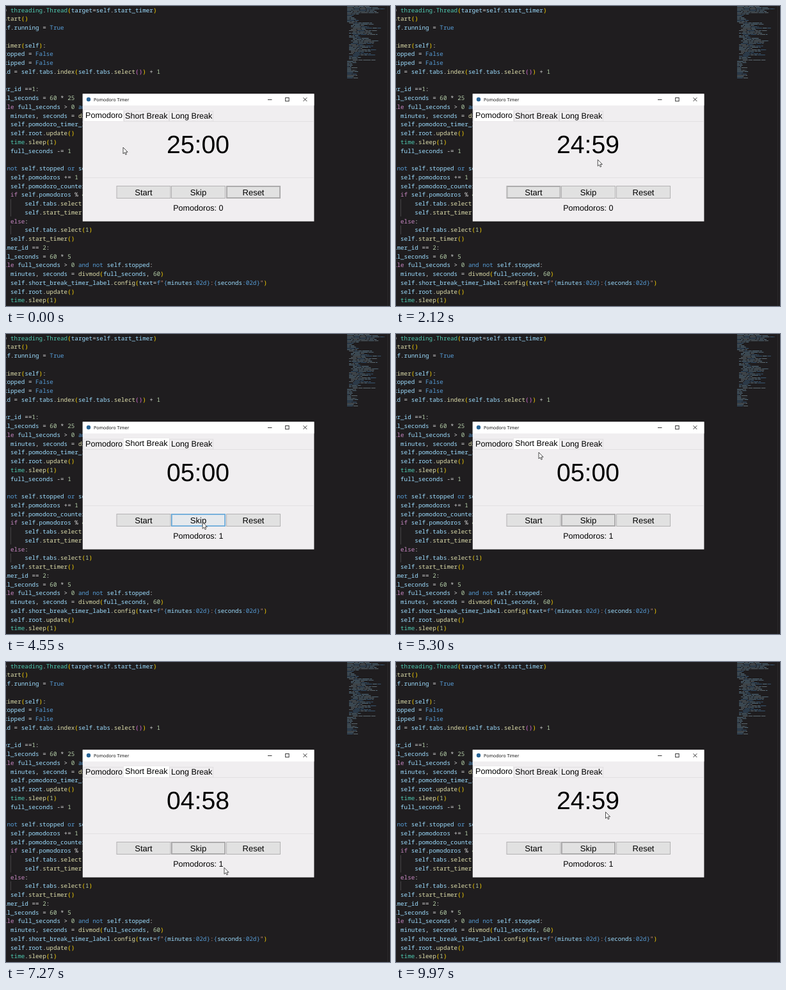
Animation of 600x469 px, one loop 10000 ms. Source, as an HTML page:

```html
<!DOCTYPE html>
<html lang="en">
<head>
<meta charset="utf-8">
<title>Pomodoro Timer</title>
<style>
  html, body { margin: 0; width: 100%; height: 100%; overflow: hidden; background: #1f1d1f; }
  svg { display: block; width: 600px; height: 469px; }
  text { white-space: pre; text-rendering: geometricPrecision; }
  #code { font: 500 9.29px "Noto Sans Mono", monospace; }
  #app { font: 12.6px "Liberation Sans", Arial, sans-serif; fill: #000; }
  #app .title { font: 7px "Open Sans", sans-serif; fill: #000; }
  .mid { text-anchor: middle; }
  #app .clock { font-size: 39.2px; }
  .btn text { font-size: 13px; }
  .btn .face { fill: #e1e1e1; stroke: #b3b2b3; }
  .btn .ring { fill: none; stroke: none; }
  .btn.focus .face { stroke: #a8a7a8; }
  .btn.focus .ring { stroke: #b0afb0; }
  .btn.hover .face { fill: #e5e9ed; stroke: #62a3d3; }
  .btn.hover.focus .ring { stroke: #8bbde2; }
  .btn.down .face { fill: #cce4f7; stroke: #3d7fb3; }
  .tab rect { fill: #f0eef0; stroke: #e0dee0; }
  .tab.on rect { fill: #fff; stroke: #ebe9eb; }
</style>
</head>
<body>
<svg viewBox="0 0 600 469">
  <rect width="600" height="469" fill="#1f1d1f"/>
  <path d="M7.5 302V329M7.5 343V357" stroke="#454345"/>
  <g id="code"></g>
  <g id="map"></g>
  <path d="M596.5 0V469" stroke="#2b292b"/>
  <g id="app">
    <rect x="119.8" y="137.3" width="361.6" height="199.4" fill="#f0eef0"/>
    <rect x="119.8" y="137.3" width="361.6" height="18.2" fill="#fff"/>
    <circle cx="129" cy="146" r="3.2" fill="#2a6595"/>
    <text class="title" x="137" y="148.7">Pomodoro Timer</text>
    <g fill="none" stroke="#222" stroke-width=".9">
      <path d="M409 146.5H415.5M464.5 143.2L470.3 149M470.3 143.2L464.5 149"/>
      <rect x="436.7" y="143.4" width="5.4" height="5.4"/>
    </g>
    <path d="M120.5 180.5H480.5M120.5 268.5H480.5" stroke="#e2e0e2"/>
    <g id="tabs"></g>
    <text id="clock" class="mid clock" x="300" y="229.7"></text>
    <g id="buttons"></g>
    <text id="count" class="mid" x="300.4" y="320"></text>
  </g>
  <path id="cursor" d="M0 0V10L2.3 7.9L3.9 11.4L5.5 10.7L4 7.3H7.1Z" fill="#fff" stroke="#222" stroke-width=".8"/>
</svg>
<script>
const $ = id => document.getElementById(id);

function add(parent, tag, attrs = {}, text = "") {
  const el = document.createElementNS("http://www.w3.org/2000/svg", tag);
  for (const key in attrs) el.setAttribute(key, attrs[key]);
  el.textContent = text;
  return parent.appendChild(el);
}

// Code editor. Lines start two columns left of the x = 7 indent.
const CODE = `= threading.Thread(target=self.start_timer)
start()
lf.running = True

timer(self):
topped = False
kipped = False
id = self.tabs.index(self.tabs.select()) + 1

er_id ==1:
ll_seconds = 60 * 25
ile full_seconds > 0 and not self.stopped:
  minutes, seconds = divmod(full_seconds, 60)
  self.pomodoro_timer_label.config(text="")
  self.root.update()
  time.sleep(1)
  full_seconds -= 1

 not self.stopped or self.skipped:
  self.pomodoros += 1
  self.pomodoro_counter_label.config(text="")
  if self.pomodoros % 4 == 0:
      self.tabs.select(2)
      self.start_timer()
  else:
      self.tabs.select(1)
  self.start_timer()
imer_id == 2:
ll_seconds = 60 * 5
ile full_seconds > 0 and not self.stopped:
  minutes, seconds = divmod(full_seconds, 60)
  self.short_break_timer_label.config(text=f"{minutes:02d}:{seconds:02d}")
  self.root.update()
  time.sleep(1)`.split("\n");

const RULES = [
  [/^(f(?=")|:02d|[{}])/, "#569cd6"],
  [/^("|:(?=\{))/, "#ce9178"],
  [/^(if|else|ile)\b/, "#c586c0"],
  [/^(and|not|or|True|False)\b/, "#569cd6"],
  [/^(threading|Thread|time)\b/, "#4ec9b0"],
  [/^[a-z_]\w*(?=\()/, "#dcdcaa"],
  [/^[a-z_]\w*/i, "#9cdcfe"],
  [/^\d+/, "#b5cea8"],
  [/^(\s+|.)/, "#d4d4d4"]
];
const BRACKETS = ["#ffd700", "#da70d6"];

CODE.forEach((line, row) => {
  const text = add($("code"), "text", { x: -4.1, y: 9.6 + row * 13.75 });
  let depth = 0;
  while (line) {
    const [rule, ink] = RULES.find(([r]) => r.test(line));
    const word = line.match(rule)[0];
    let fill = ink;
    if (word === "(") fill = BRACKETS[depth++];
    if (word === ")") fill = BRACKETS[--depth];
    add(text, "tspan", { fill }, word);
    line = line.slice(word.length);
  }
});

// Minimap: short coloured dashes, a wide header and then indented blocks.
let seed = 7;
const rand = () => (seed = (seed * 16807) % 2147483647) / 2147483647;
const INKS = ["#9cdcfe", "#9cdcfe", "#8fc4e0", "#a9c8d4", "#569cd6"];
for (let row = 0; row < 57; row++) {
  const head = row < 6, brief = row > 5 && row < 13 || row > 42;
  let x = 533;
  if (!head && !brief) x += 3 * Math.floor(1 + rand() * 2.6);
  const end = x + (head ? 35 + rand() * 26 : brief ? 6 + rand() * 13 : 12 + rand() * 32);
  while (x < end) {
    const width = Math.min(3 + rand() * 9, end - x);
    add($("map"), "rect", {
      x, y: row * 2, width, height: 1, opacity: 0.45,
      fill: INKS[Math.floor(rand() * INKS.length)]
    });
    x += width + 1;
  }
}

// Timer window.
const tabs = [["Pomodoro", 121, 184, 124], ["Short Break", 184, 255, 186], ["Long Break", 255, 324, 258]]
  .map(([label, left, right, x]) => {
    const el = add($("tabs"), "g");
    const box = add(el, "rect");
    const text = add(el, "text", { x }, label);
    return { el, box, text, left, right };
  });

const buttons = [["Start", 173], ["Skip", 258.5], ["Reset", 344.5]].map(([label, x]) => {
  const el = add($("buttons"), "g");
  add(el, "rect", { class: "face", x, y: 281.5, width: 84, height: 19 });
  add(el, "rect", { class: "ring", x: x + 1, y: 282.5, width: 82, height: 17 });
  add(el, "text", { class: "mid", x: x + 42, y: 295.5 }, label);
  return { el, x };
});

function showTab(active) {
  tabs.forEach(({ el, box, text, left, right }, i) => {
    const on = i === active, grow = on && i ? 1 : 0;
    el.setAttribute("class", on ? "tab on" : "tab");
    box.setAttribute("x", left - grow + 0.5);
    box.setAttribute("width", right - left + 2 * grow - 1);
    box.setAttribute("y", on ? 162.5 : 164.5);
    box.setAttribute("height", on ? 18 : 16);
    text.setAttribute("y", on ? 175 : 176.1);
  });
}

// Seconds, clock, tab, finished pomodoros
const STATES = [
  [0, "25:00", 0, 0], [1.45, "24:59", 0, 0], [2.46, "24:58", 0, 0], [3.46, "24:57", 0, 0],
  [4.22, "25:00", 0, 0], [4.47, "05:00", 1, 1], [5.47, "04:59", 1, 1], [6.48, "04:58", 1, 1],
  [7.48, "04:57", 1, 1], [8.1, "05:00", 1, 1], [8.48, "25:00", 0, 1], [9.48, "24:59", 0, 1]
];

// Seconds, button index
const CLICKS = [[-1, 2], [0.44, 0], [4.22, 1], [8.1, 1]];

// Seconds, x, y
const PATH = [
  [0, 183, 221], [0.06, 183, 221], [0.38, 214, 291], [0.5, 214, 291], [0.67, 258, 182],
  [0.85, 306, 231], [1.1, 306, 232], [1.4, 270, 236], [1.8, 322, 238], [2.1, 316, 240],
  [2.5, 222, 272], [2.67, 256, 276], [2.97, 256, 276], [3.42, 310, 298.5], [4.5, 310, 298.5],
  [4.95, 230, 180], [5.3, 223, 185], [6.25, 223, 182], [6.6, 290, 236], [6.9, 318, 234],
  [7.22, 341, 321.5], [7.3, 341, 321.5], [7.62, 391, 310], [7.98, 303.5, 295], [8.55, 303.5, 295],
  [9, 182, 178], [9.35, 166, 176], [9.7, 268, 232], [9.95, 327.5, 234.5], [10, 327.5, 234.5]
];

const latest = (list, t) => list.filter(item => item[0] <= t).pop();

function pointer(t) {
  const i = PATH.findIndex(p => p[0] > t);
  const [t0, x0, y0] = PATH[i - 1], [t1, x1, y1] = PATH[i];
  const u = (t - t0) / (t1 - t0), k = u * u * (3 - 2 * u);
  return [x0 + (x1 - x0) * k, y0 + (y1 - y0) * k];
}

function render(t) {
  const [, clock, tab, count] = latest(STATES, t);
  const [clicked, focus] = latest(CLICKS, t);
  const [x, y] = pointer(t);
  $("clock").textContent = clock;
  $("count").textContent = "Pomodoros: " + count;
  showTab(tab);
  buttons.forEach((button, i) => {
    const hover = x >= button.x && x <= button.x + 84 && y >= 281 && y <= 301;
    const down = i === focus && t - clicked < 0.1;
    button.el.setAttribute("class",
      "btn" + (i === focus ? " focus" : "") + (hover ? " hover" : "") + (down ? " down" : ""));
  });
  $("cursor").setAttribute("transform", `translate(${x} ${y})`);
}

const start = performance.now();
function frame() {
  render((performance.now() - start) / 1000 % 10);
  requestAnimationFrame(frame);
}
frame();
</script>
</body>
</html>
```
